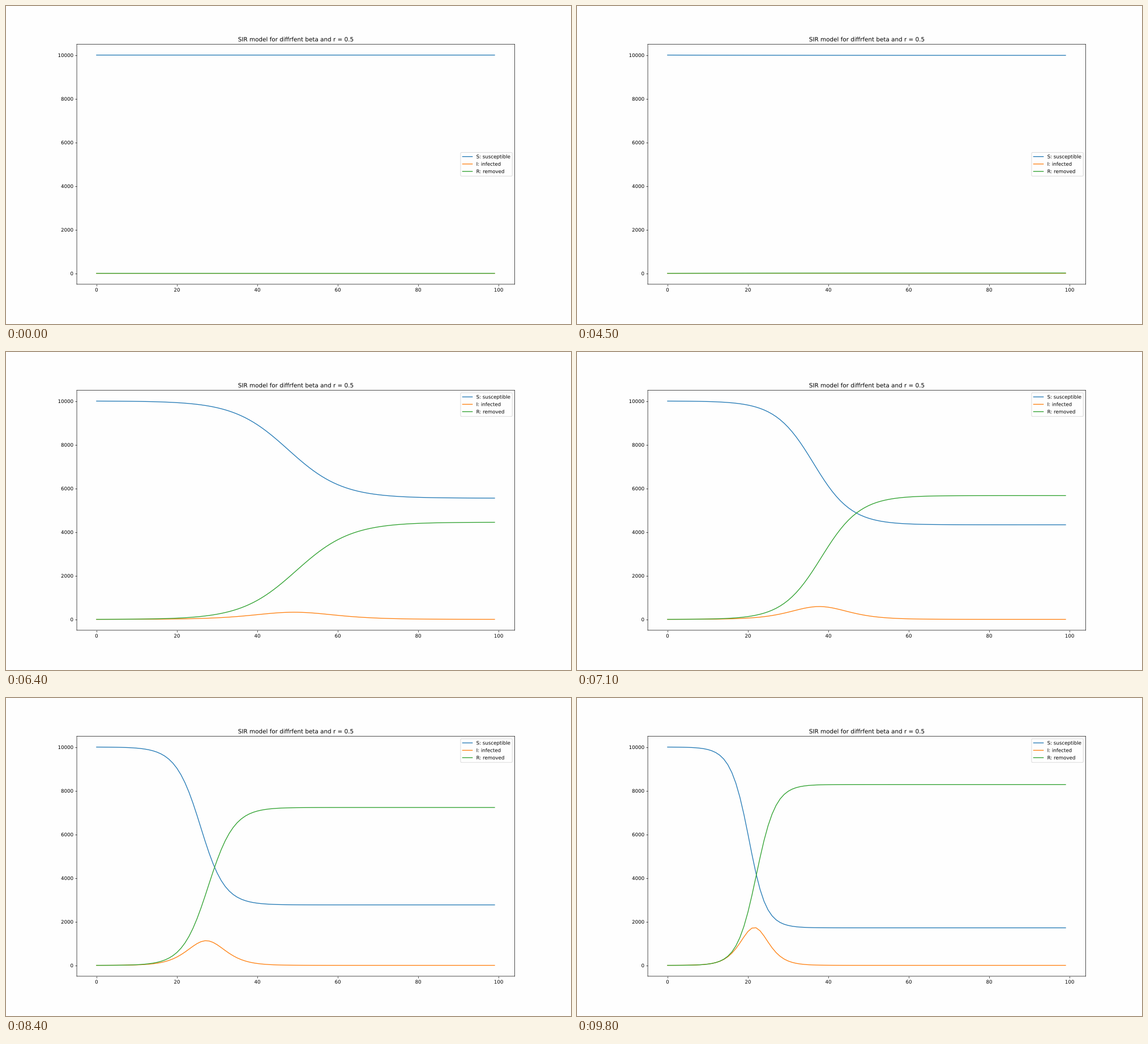
A matplotlib script that plays this animation: 998x561 px, repeating every 9900 ms.

```python
import numpy as np
import matplotlib.pyplot as plt
from matplotlib.animation import FuncAnimation
from matplotlib.patheffects import Normal

W, H, DPI = 998, 561, 62.375
FRAMES, INTERVAL = 99, 100
N, DAYS, R_RATE = 10000, 100, 0.5
PAPER = "#fefefe"
BETAS = np.linspace(0, 1, 100)

# The layout lives on a finer 1600 x 900 grid, with the frame on half cells.
GRID_W, GRID_H = 1600, 900
LEFT, RIGHT, BOTTOM, TOP = 200.5, 1440.5, 112.5, 791.5


def simulate(beta):
    """Step the SIR model one day at a time from a single infected person."""
    s, i, r = float(N), 1.0, 0.0
    days = []
    for _ in range(DAYS):
        days.append((s, i, r))
        new, gone = beta * s * i / N, R_RATE * i
        s, i, r = s - new, i + new - gone, r + gone
    return np.array(days).T


# Soft, unsnapped strokes, and text drawn as outlines at exact positions.
plt.rcParams.update({
    "font.family": "DejaVu Sans",
    "text.hinting": "none",
    "path.snap": False,
    "path.effects": [Normal()],
})

fig, ax = plt.subplots(figsize=(W / DPI, H / DPI), dpi=DPI, facecolor=PAPER)
fig.subplots_adjust(left=LEFT / GRID_W, right=RIGHT / GRID_W,
                    bottom=BOTTOM / GRID_H, top=TOP / GRID_H)
ax.set_facecolor(PAPER)
ax.set_title("SIR model for diffrfent beta and r = 0.5")

x = np.arange(DAYS)
labels = ("S: susceptible", "I: infected", "R: removed")
lines = [ax.plot(x, 0 * x, label=name)[0] for name in labels]

# Five percent margins, less the half cell by which the frame is offset.
span_x, span_y = 1.1 * (DAYS - 1), 1.1 * N
half_x = 0.5 * span_x / (RIGHT - LEFT)
half_y = 0.5 * span_y / (TOP - BOTTOM)
ax.set_xlim(-0.05 * (DAYS - 1) + half_x, 1.05 * (DAYS - 1) + half_x)
ax.set_ylim(-0.05 * N, 1.05 * N - half_y)
legend = ax.legend(loc="center right", facecolor=PAPER)


def draw(frame):
    beta = BETAS[frame + 1] if frame else 0.0
    for line, values in zip(lines, simulate(beta)):
        line.set_ydata(values)
    # the box leaves the middle once the curves start to bend towards it
    legend.set_loc("upper right" if frame >= 49 else "center right")
    return lines


anim = FuncAnimation(fig, draw, frames=FRAMES, interval=INTERVAL,
                     init_func=lambda: draw(0), repeat=True, repeat_delay=0)
plt.show()
```
